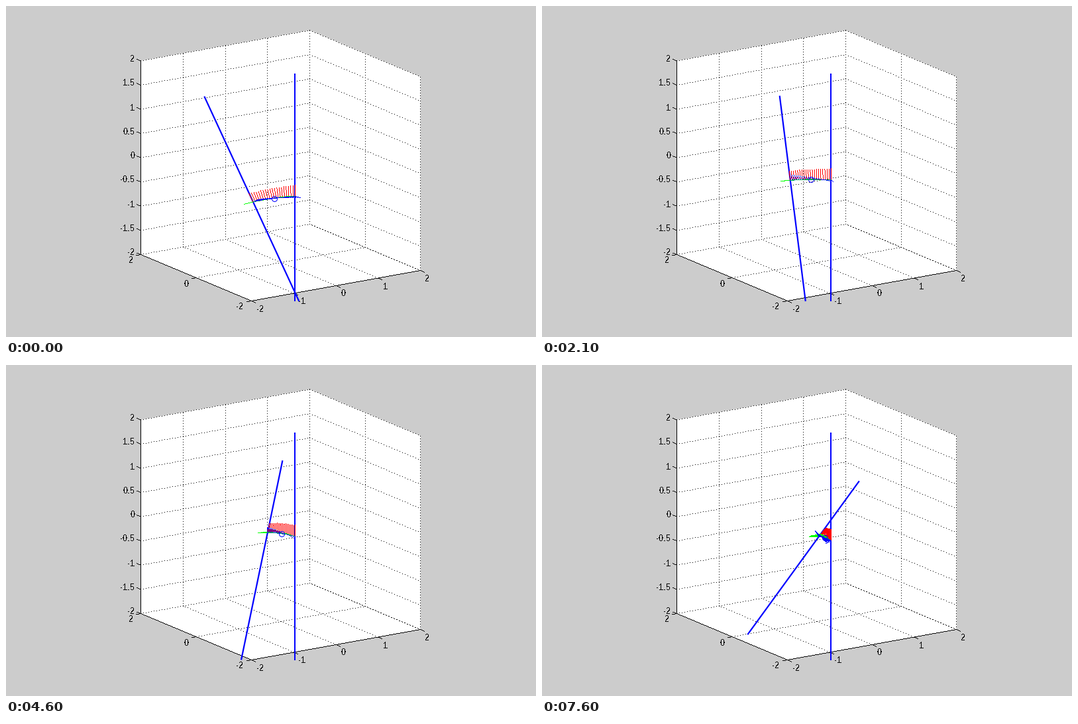
Recreate the animation shown at these times as a matplotlib script. Size 800 by 500 pixels, loop 8 s.

```python
import numpy as np
import matplotlib.pyplot as plt
from matplotlib.animation import FuncAnimation
from matplotlib.collections import PolyCollection

plt.rcParams.update({
    "font.family": "Liberation Sans",
    "text.antialiased": False,
    "text.hinting": "native",
    "text.hinting_factor": 1,
})

W, H, DPI = 800, 500, 100
PX = 72 / DPI                      # one pixel in points
FLOOR = 445.5                      # lower clipping edge of the plot
fig = plt.figure(figsize=(W / DPI, H / DPI), dpi=DPI, facecolor="#cccccc")
ax = fig.add_axes([0, 0, 1, 1])
ax.set_xlim(-0.5, W - 0.5)
ax.set_ylim(H - 0.5, -0.5)
ax.axis("off")

# ---- crisp one-pixel drawing ----
SQUARE = 0.45 * np.array([[-1, -1], [1, -1], [1, 1], [-1, 1]])


def raster(p, q, step=1):
    """Pixel positions along p-q, one every `step` pixels."""
    p, q = np.asarray(p, float), np.asarray(q, float)
    span = max(abs(q - p))
    t = np.arange(0, span + 0.01, step) / max(span, 1)
    return np.floor(p + np.outer(t, q - p) + 0.5)


def pixels(color, z):
    art = PolyCollection([], facecolors=color, edgecolors="none", linewidths=0,
                         antialiaseds=False, zorder=z)
    return ax.add_collection(art)


def fill(art, runs):
    art.set_verts(np.concatenate(runs)[:, None, :] + SQUARE)


# ---- fixed 3D box, orthographic view ----
CORNER = np.array([370, 445])
EX = np.array([63.75, -11.5])
EY = np.array([-41.75, -17.5])
EZ = np.array([0, -73.15])


def project(x, y, z):
    return CORNER + (x + 2) * EX + (y + 2) * EY + (z + 2) * EZ


outline = [project(*c) for c in
           [(-2, 2, 2), (2, 2, 2), (2, -2, 2), (2, -2, -2), (-2, -2, -2), (-2, 2, -2)]]
ax.add_patch(plt.Polygon(outline, fc="white", ec="none", zorder=1))

frame = []


def edge(a, b, step=1):
    frame.append(raster(project(*a), project(*b), step))


def tick(p, d, text, offset, ha):
    frame.append(raster(p, p + d))
    x, y = p + offset
    ax.text(round(x), round(y + 4.5), text, ha=ha, va="baseline",
            fontsize=13.33 * PX, zorder=3)


for z in np.arange(-2, 2.1, 0.5):
    edge((-2, 2, z), (2, 2, z), 4)
    edge((2, 2, z), (2, -2, z), 4)
    tick(project(-2, 2, z), (-6, -2.5), f"{z:g}", (-9, -3.5), "right")
for x in range(-2, 3):
    edge((x, 2, -2), (x, 2, 2), 4)
    edge((x, -2, -2), (x, 2, -2), 4)
    tick(project(x, -2, -2), (6, 2.5), f"{x}", (7.5, 12), "left")
for y in (-2, 0, 2):
    edge((-2, y, -2), (2, y, -2), 4)
    edge((2, y, -2), (2, y, 2), 4)
    tick(project(-2, y, -2), (-7, 1.3), f"{y}", (-11.5, 8.5), "right")

edge((-2, 2, -2), (-2, 2, 2))
edge((-2, 2, -2), (-2, -2, -2))
edge((-2, -2, -2), (2, -2, -2))
fill(pixels("black", 2), frame)

# ---- moving parts ----
ROD = dict(color="blue", solid_capstyle="butt", zorder=4)
ax.plot([435.5, 435.5], [101.5, FLOOR], lw=2 * PX, **ROD)
rod, = ax.plot([], [], lw=2.2 * PX, **ROD)
red, green, blue = pixels("red", 5), pixels("lime", 6), pixels("blue", 7)
ring, = ax.plot([], [], "o", ms=8 * PX, mfc="none", mec="blue", mew=PX, zorder=8)

U = np.linspace(0, 1, 21)[:, None]     # 0 at the fixed rod, 1 at the moving one


def cubic(*values):
    """Smooth course through its values at four steps."""
    return np.poly1d(np.polyfit([0, 5, 10, 16], values, 3))


joint_x = cubic(372.5, 374.3, 394.4, 417.5)
joint_y = cubic(295.5, 263, 252.5, 258.5)
anchor_y = cubic(287, 262.5, 258.5, 265)


def draw(k):
    s = (k + 4) // 5                   # the pose changes every half second

    tilt = np.radians(24.8 - 3.4 * s - 0.025 * s * s)
    up = np.array([-np.sin(tilt), -np.cos(tilt)])
    reach = 100 + 75.7 * np.exp(-s / 5.2)
    start = np.array([436, anchor_y(s)])
    end = np.array([joint_x(s), joint_y(s)])
    top = end + reach * up
    drop = min(1.77 * reach, (FLOOR - end[1]) / -up[1])
    bottom = end - drop * up
    rod.set_data([top[0], bottom[0]], [top[1], bottom[1]])

    # the flexing strip between the rods, slightly arched
    curve = start + U * (end - start)
    curve[:, 1] -= 4.8 * (U * (1 - U))[:, 0]

    def fan(art, a, b):
        tips = curve + a + U * (np.asarray(b) - a)
        fill(art, [raster(p, q) for p, q in zip(curve, tips)])

    chord = (end - start) / np.hypot(*(end - start))
    out = np.array([-14.5, 3.5 * np.exp(-s / 4)])
    fan(red, np.array([0, -17]), 14.5 * up)
    fan(green, 29 * chord - out, out)
    fan(blue, np.array([8 - s, 2 + 0.13 * s]),
        (7 - 0.8 * s, 5 * np.exp(-s / 2) - 9))
    ring.set_data([curve[10, 0]], [curve[10, 1]])
    return rod, red, green, blue, ring


anim = FuncAnimation(fig, draw, frames=80, interval=100, repeat=True,
                     repeat_delay=0, blit=False)
plt.show()
```
